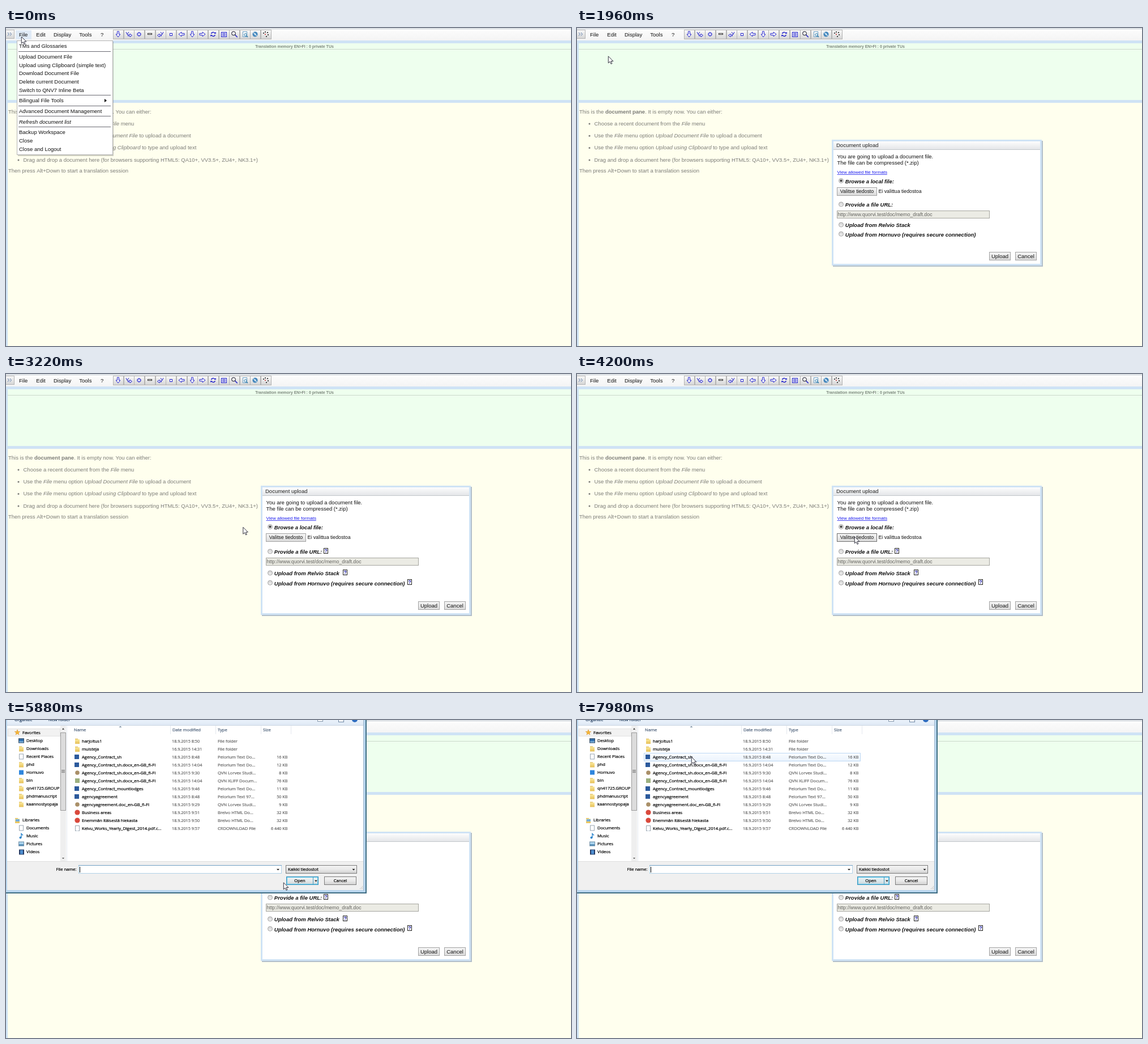
Write an HTML page with a canvas that moves like this. It is 998 by 561 pixels and loops after 8 s.

```html
<!DOCTYPE html>
<html lang="en">
<head>
<meta charset="utf-8">
<title>Document upload</title>
<style>
html, body { margin: 0; width: 100%; height: 100%; overflow: hidden; background: #ffffee; }
canvas { display: block; }
</style>
</head>
<body>
<canvas id="stage" width="998" height="561"></canvas>
<script>
const ctx = document.getElementById('stage').getContext('2d');
const LOOP = 8000, STEP = 140;
const ARIAL = '"Liberation Sans", Arial, sans-serif';
const UI = '"Open Sans", "Noto Sans", sans-serif';
const BLUE = '#2424cc', FRAME = '#cfe3f5';

// Pointer tip: time, x, y
const PATH = [
  [0, 27, 15], [700, 27, 15], [840, 38, 30], [980, 56, 60], [1120, 55, 49.5],
  [2380, 55, 49.5], [2660, 92, 82], [3080, 370, 240], [3360, 467, 300],
  [3500, 471, 295.5], [3640, 478, 292], [4200, 490, 286.5], [6580, 490, 286.5],
  [6720, 474, 278], [7140, 278, 186.5], [7560, 232, 104], [7700, 216, 80],
  [7840, 204, 69], [7980, 202, 65]
];

const MENU = [
  ['TMs and Glossaries', 32], ['Upload Document File', 50.5],
  ['Upload using Clipboard (simple text)', 65.5], ['Download Document File', 80],
  ['Delete current Document', 94.8], ['Switch to QNV7 Inline Beta', 109.5],
  ['Bilingual File Tools', 128], ['Advanced Document Management', 147],
  ['_Refresh document list_', 165.5], ['Backup Workspace', 184],
  ['Close', 198.8], ['Close and Logout', 213.5]
];

const FILES = [
  ['folder', 'harjoitus1', '18.9.2015 8:50', 'File folder', ''],
  ['folder', 'muisteja', '16.9.2015 14:31', 'File folder', ''],
  ['text', 'Agency_Contract_sh', '18.9.2015 8:48', 'Pelorium Text Do...', '16 KB'],
  ['text', 'Agency_Contract_sh.docx_en-GB_fi-FI', '16.9.2015 14:04', 'Pelorium Text Do...', '12 KB'],
  ['tool', 'Agency_Contract_sh.docx_en-GB_fi-FI', '18.9.2015 9:30', 'QVN Lorvex Studi...', '8 KB'],
  ['xml', 'Agency_Contract_sh.docx_en-GB_fi-FI', '16.9.2015 14:04', 'QVN XLIFF Docum...', '76 KB'],
  ['text', 'Agency_Contract_mountlodges', '16.9.2015 9:46', 'Pelorium Text Do...', '11 KB'],
  ['text', 'agencyagreement', '18.9.2015 8:48', 'Pelorium Text 97...', '50 KB'],
  ['tool', 'agencyagreement.doc_en-GB_fi-FI', '18.9.2015 9:29', 'QVN Lorvex Studi...', '9 KB'],
  ['web', 'Business areas', '18.9.2015 9:51', 'Brelvo HTML Do...', '32 KB'],
  ['web', 'Enemmän itäisestä hiekasta', '18.9.2015 9:50', 'Brelvo HTML Do...', '32 KB'],
  ['page', 'Kelvu_Works_Yearly_Digest_2014.pdf.c...', '18.9.2015 9:57', 'CRDOWNLOAD File', '6 440 KB']
];

const PLACES = [
  ['screen', 'Desktop'], ['folder', 'Downloads'], ['page', 'Recent Places'], ['folder', 'phd'],
  ['cloud', 'Hornuvo'], ['folder', 'bin'], ['folder', 'qn41725.GROUP'],
  ['folder', 'phdmanuscript'], ['folder', 'kaannostyopaja']
];
const LIBRARIES = [['page', 'Documents'], ['note', 'Music'], ['image', 'Pictures'], ['film', 'Videos']];

function fill(x, y, w, h, color) {
  ctx.fillStyle = color;
  ctx.fillRect(x, y, w, h);
}
function shade(y, h, ...colors) {
  const g = ctx.createLinearGradient(0, y, 0, y + h);
  colors.forEach((c, i) => g.addColorStop(i / (colors.length - 1), c));
  return g;
}
function box(x, y, w, h, color, edge) {
  fill(x, y, w, h, color);
  ctx.strokeStyle = edge;
  ctx.lineWidth = 1;
  ctx.strokeRect(x + .5, y + .5, w - 1, h - 1);
}
function poly(points, color, edge, width = 1) {
  ctx.beginPath();
  points.forEach(([x, y]) => ctx.lineTo(x, y));
  ctx.closePath();
  if (color) { ctx.fillStyle = color; ctx.fill(); }
  if (edge) { ctx.strokeStyle = edge; ctx.lineWidth = width; ctx.stroke(); }
}
function line(points, color, width = 1) {
  ctx.beginPath();
  points.forEach(([x, y]) => ctx.lineTo(x, y));
  ctx.strokeStyle = color;
  ctx.lineWidth = width;
  ctx.stroke();
}
function disc(x, y, r, color, edge, width = 1) {
  ctx.beginPath();
  ctx.arc(x, y, r, 0, 7);
  if (color) { ctx.fillStyle = color; ctx.fill(); }
  if (edge) { ctx.strokeStyle = edge; ctx.lineWidth = width; ctx.stroke(); }
}
// y is the middle of the capitals
function text(str, x, y, color, size = 9.5, style = '', family = ARIAL, align = 'left') {
  ctx.font = `${style} ${size}px ${family}`;
  ctx.textAlign = align;
  ctx.fillStyle = color;
  ctx.fillText(str, x, y + size * .36);
  return ctx.measureText(str).width;
}
// *bold* and _italic_ runs
function rich(str, x, y, color) {
  for (const run of str.split(/(\*[^*]+\*|_[^_]+_)/)) {
    const style = { '*': 'bold', '_': 'italic' }[run[0]];
    x += text(style ? run.slice(1, -1) : run, x, y, color, 9.5, style || '');
  }
}
// Small system text, slightly thickened
function ui(str, x, y, color = '#000', size = 7.55, align = 'left') {
  text(str, x, y, color, size, '', UI, align);
  ctx.strokeStyle = color;
  ctx.lineWidth = .22;
  ctx.strokeText(str, x, y + size * .36);
}
const down = (x, y, r = 2.5, color = '#111') => poly([[x - r, y - r / 2], [x + r, y - r / 2], [x, y + r / 2]], color);

function at(x, y, angle, draw) {
  ctx.save();
  ctx.translate(x, y);
  ctx.rotate(angle);
  draw();
  ctx.restore();
}
function arrow(x, y, turns, k = 1) {
  const p = [[-5, -1.4], [0, -1.4], [0, -3.8], [5, 0], [0, 3.8], [0, 1.4], [-5, 1.4]];
  at(x, y, turns * Math.PI * 2, () => poly(p.map(([a, b]) => [a * k, b * k]), '#fff', BLUE));
}
function lens(x, y, r) {
  line([[x + r * .7, y + r * .7], [x + r * 2.1, y + r * 2.1]], BLUE, 1.6);
  disc(x, y, r, '#fff', '#223', 1.1);
}

const TOOLS = [
  () => arrow(0, 0, .25),
  () => { line([[-5, -4], [-3, 0], [0, -4]], BLUE); line([[-3, 0], [-1, 2]], BLUE); arrow(2, 2, 0, .7); },
  () => { fill(-1.8, -3.5, 3.6, 7, BLUE); fill(-3.5, -1.8, 7, 3.6, BLUE); fill(-.8, -2.5, 1.6, 5, '#fff'); fill(-2.5, -.8, 5, 1.6, '#fff'); },
  () => box(-4, -2, 8, 3, '#fff', '#333'),
  () => { line([[5, -4], [3, 0], [0, -4]], BLUE); line([[3, 0], [1, 2]], BLUE); arrow(-2, 2, .5, .7); },
  () => box(-2, -2, 5, 5, '#fff', BLUE),
  () => arrow(0, 0, .5),
  () => arrow(0, 0, .25),
  () => arrow(0, 0, 0),
  () => {
    for (const turn of [0, Math.PI]) at(0, 0, turn, () => {
      ctx.beginPath();
      ctx.arc(0, 0, 3.5, 3.4, 5.9);
      ctx.strokeStyle = BLUE;
      ctx.lineWidth = 1.5;
      ctx.stroke();
      poly([[1.6, -1.2], [5.2, -1.2], [4.6, -4]], BLUE);
    });
  },
  () => { box(-5, -4, 10, 9, '#fff', BLUE); for (let y = -2; y < 4; y += 2) fill(-3, y, 6, 1, BLUE); },
  () => lens(-1, -1.5, 3.2),
  () => { box(-4, -5, 8, 10, '#fff', '#6c9fc4'); disc(1, 1, 2.3, '#e6f3fa', '#2c78a8'); line([[2.5, 2.5], [5, 5]], '#2c78a8', 1.4); },
  () => { disc(0, 0, 4.6, '#4688bd'); disc(0, 0, 1.4, '#fff'); line([[-3, -3], [3, 3]], '#cfe4f3', 1.2); },
  () => [[-4, -2], [-1, -4], [3, -3], [-1, 0], [4, 1], [1, 4]].forEach(([x, y], i) => disc(x, y, 1, i == 3 ? '#c33' : '#111'))
];

function page(menuOpen) {
  fill(0, 0, 998, 561, '#ffffee');
  fill(0, 0, 998, 23, shade(0, 23, '#fdfdfd', '#f4f4f4'));
  fill(0, 1, 998, 1, '#b9c2cb');
  fill(0, 22, 998, 5, FRAME);
  fill(3, 27, 995, 100, '#eeffee');
  fill(3, 37, 995, 1, '#cbd8cb');
  fill(0, 127, 998, 5, FRAME);
  fill(0, 22, 3, 539, FRAME);
  box(-1, 3, 16, 16, shade(3, 16, '#fafafa', '#d4d4d4'), '#b5b5b5');
  for (const x of [3, 7]) line([[x, 8], [x + 2.5, 10.8], [x, 13.6]], '#5578a8');
  if (menuOpen) fill(17, 4, 28, 16, '#dfeaf6');
  [['File', 23], ['Edit', 53.3], ['Display', 84], ['Tools', 129.3], ['?', 167]].forEach(([s, x]) => text(s, x, 12, '#111'));
  TOOLS.forEach((draw, i) => {
    const x = Math.round(189 + i * 18.65);
    box(x, 3, 19, 17, shade(3, 17, '#fcfcfc', '#d3d3d3'), '#b4b4b4');
    at(x + 9, 11, 0, draw);
  });
  text('Translation memory EN>FI : 0 private TUs', 509.5, 32, '#7b857b', 7, 'bold', ARIAL, 'center');

  const gray = '#7c7c78';
  rich('This is the *document pane*. It is empty now. You can either:', 4, 148, gray);
  [
    'Choose a recent document from the _File_ menu',
    'Use the _File_ menu option _Upload Document File_ to upload a document',
    'Use the _File_ menu option _Upload using Clipboard_ to type and upload text',
    'Drag and drop a document here (for browsers supporting HTML5: QA10+, VV3.5+, ZU4+, NK3.1+)'
  ].forEach((s, i) => {
    const y = 168.2 + i * 21.3;
    disc(22, y + .8, 1.5, gray);
    rich(s, 30.5, y, gray);
  });
  rich('Then press Alt+Down to start a translation session', 4, 252, gray);
}

function menu(tipY) {
  fill(21, 24, 169, 202, 'rgba(0,0,0,.18)');
  box(19, 22, 170, 202, '#fff', '#b4b4b4');
  for (const [s, y] of MENU) {
    if (Math.abs(y - tipY) < 7.35) fill(22, y - 7.3, 163, 14.6, '#dfebf9');
    rich(s, 23, y, '#111');
  }
  for (const y of [41, 118, 137, 155, 174]) fill(22, y, 163, 1, '#6a6a72');
  poly([[174, 125], [178, 128], [174, 131]], '#000');
}

function button(x, y, w, label, size, state) {
  const top = state == 'down' ? '#d2d2d2' : '#f7f7f7';
  const low = state == 'down' ? '#e4e4e4' : '#dadada';
  box(x, y, w, 15, shade(y, 15, top, low), state ? '#6f6f6f' : '#a2a2a2');
  text(label, x + w / 2, y + 7.2, '#111', size, '', ARIAL, 'center');
}
function radio(y, on) {
  disc(466.5, y, 4, shade(y - 4, 8, '#d2d2d2', '#f2f2f2'), '#a5a5a5');
  if (on) disc(466.5, y, 2.1, '#444');
}
function help(x, y) {
  box(x, y, 8, 10, '#fff', '#222');
  text('?', x + 4, y + 5, '#1414a0', 8.5, 'bold', ARIAL, 'center');
}

// Before the help icons load the lower rows sit a little higher
function uploadBox(loaded, state) {
  const up = n => loaded ? 0 : n, h = 228 - up(6);
  fill(452, 199, 371, h, '#b3bfca');
  fill(450, 197, 371, h, FRAME);
  fill(453, 200, 365, h - 6, '#fff');
  fill(453, 200, 365, 14, shade(200, 14, '#fdfdfd', '#e4e6e9'));
  fill(453, 214, 365, 1, '#c2c6ca');
  text('Document upload', 458, 207, '#222');
  text('You are going to upload a document file.', 459.5, 227, '#111');
  text('The file can be compressed (*.zip)', 459.5, 237.7, '#111');
  const w = text('View allowed file formats', 459.5, 254, '#1a1aee', 8.05);
  fill(459.5, 258, w, .8, '#1a1aee');
  const label = (s, y) => text(s, 473.8, y, '#111', 9.5, 'italic bold');
  radio(269.5, true);
  label('Browse a local file:', 271);
  button(459, 281, 71, 'Valitse tiedosto', 8.9, state);
  text('Ei valittua tiedostoa', 532.5, 288, '#111', 8.77);
  radio(313 - up(2));
  label('Provide a file URL:', 314 - up(2));
  box(459, 324 - up(2), 270, 14, '#ebebe4', '#a6a6a0');
  text('http://www.quorvi.test/doc/memo_draft.doc', 460.5, 331 - up(2), '#62625e', 8.85);
  radio(351 - up(4));
  label('Upload from Relvio Stack', 352 - up(4));
  radio(368.3 - up(5));
  label('Upload from Hornuvo (requires secure connection)', 369.5 - up(5));
  if (loaded) [[561, 307], [595, 345], [709, 362]].forEach(p => help(...p));
  button(728, 401 - up(6), 38, 'Upload', 9.5);
  button(774, 401 - up(6), 38, 'Cancel', 9.5);
}

const ICONS = {
  folder() { fill(-4, -4, 5, 2, '#d9b24a'); fill(-4, -3, 8, 8, shade(-3, 8, '#fbeaa0', '#e6bf55')); },
  text() { fill(-5, -4, 8, 8, '#2c5a9c'); },
  tool() { disc(0, 0, 3.8, '#a98f68'); },
  xml() { fill(-4, -4, 8, 8, '#9db07f'); },
  web() { disc(0, 0, 4.6, '#d9493c'); },
  cloud() { fill(-4, -4, 8, 8, '#2f86dd'); },
  page() { box(-4, -5, 8, 10, '#fff', '#9aa5b0'); fill(-2, 4, 4, 1, '#c8d4e0'); },
  screen() { box(-5, -4, 10, 8, '#2f6fb0', '#3a4d60'); fill(-4, 1, 8, 2, '#84b7dd'); },
  note() { disc(-1.5, 3, 2, '#2f86cc'); line([[0, 3], [0, -4], [3, -1]], '#2f86cc', 1.4); },
  image() { box(-5, -4, 10, 8, '#a9d3ee', '#7891a6'); fill(-4, 1, 8, 2, '#3d7aa8'); },
  film() { fill(-4, -4, 9, 9, '#253a63'); fill(-2, -3, 5, 7, '#4d8ed0'); }
};
const icon = (name, x, y) => at(x, y, 0, ICONS[name]);

function star(x, y) {
  const p = [...Array(10).keys()].map(i => {
    const a = i * Math.PI / 5 - Math.PI / 2, r = i % 2 ? 2 : 5;
    return [x + r * Math.cos(a), y + r * Math.sin(a)];
  });
  poly(p, '#f7b733', '#d98f22', .6);
}

function filePicker(t, tip) {
  fill(0, 0, 637, 306, '#3f6d84');
  fill(0, 0, 635, 304, '#b9d6ee');
  fill(631, 0, 1, 301, '#a3bace');
  fill(2, 0, 629, 300, '#fff');
  fill(2, 0, 629, 9, shade(0, 9, '#eaf2fb', '#dfe9f5'));
  fill(2, 9, 629, 1, '#cbd6e3');
  ui('Organize', 15, -1, '#1e395b');
  down(53, -1, 2);
  ui('New folder', 75, -1, '#1e395b');
  box(550, -4, 10, 7, '#fff', '#8598ad');
  box(587, -5, 10, 9, '#fff', '#6d87a4');
  disc(616, -1, 5, '#2d6cc0');

  // Sidebar
  box(3, 15, 93, 14, '#f2f2f2', '#e2e2e2');
  star(20, 22);
  ui('Favorites', 29, 22.5);
  PLACES.forEach(([kind, s], i) => { icon(kind, 27, 36.5 + 14 * i); ui(s, 36, 36.5 + 14 * i); });
  icon('folder', 20, 177);
  fill(17, 175, 7, 4, '#76aedb');
  ui('Libraries', 29, 176.7);
  LIBRARIES.forEach(([kind, s], i) => { icon(kind, 27, 190.5 + 14 * i); ui(s, 36, 190.5 + 14 * i); });
  fill(96, 10, 10, 239, '#efefef');
  box(96, 22, 10, 138, '#dcdcdc', '#9b9b9b');
  for (const y of [88, 90, 92]) fill(98, y, 6, 1, '#777');
  poly([[99, 17], [103, 17], [101, 14]], '#444');
  down(101, 244, 2, '#444');
  fill(107, 10, 1, 239, '#e3e9f0');

  // File list
  const soft = '#666';
  [['Name', 120], ['Date modified', 294], ['Type', 374], ['Size', 454]].forEach(([s, x]) => ui(s, x, 17.5, '#4c607a'));
  for (const x of [290, 370, 450, 503]) fill(x, 10, 1, 15, '#e4e8ee');
  poly([[199.5, 13], [204.5, 13], [202, 10.5]], '#7d90a3');
  FILES.forEach(([kind, name, date, type, size], i) => {
    const y = 37 + 14 * i;
    if (tip.x < 501 && tip.y >= y - 7 && tip.y < y + 7) box(118, y - 7, 383, 15, shade(y - 7, 15, '#fafcff', '#eaf3fd'), '#bcd8f4');
    icon(kind, 126, y);
    ui(name, 134, y);
    ui(date, 293, y, soft, 7.25);
    ui(type, 374, y, soft);
    ui(size, 497.5, y, soft, 7.25, 'right');
  });

  // Lower bar
  fill(2, 249, 629, 51, '#f0f0f0');
  fill(2, 249, 629, 1, '#dfdfdf');
  ui('File name:', 88.5, 263.5);
  box(128, 256, 359, 15, '#fff', '#b0d2e8');
  fill(128, 256, 359, 1, '#6f9fc4');
  down(480.5, 264);
  if (t < 6160 || t >= 6720 && t < 7140 || t >= 7700) fill(130, 259, 1, 10, '#000');
  const gray = y => shade(y, 15, '#f4f4f4', '#eaeaea', '#cfcfcf');
  box(494, 256, 126, 15, gray(256), '#7c7c7c');
  ui('Kaikki tiedostot', 498, 263.5);
  down(614, 264);
  const glow = t < 6720 ? 0 : .5 - .5 * Math.cos((t - 6720) / 1000 * Math.PI);
  box(495, 276, 57, 15, gray(276), '#3f93ba');
  fill(496, 277, 55, 13, `rgba(160,225,250,${.05 + .15 * glow})`);
  ctx.strokeStyle = '#62cbee';
  ctx.strokeRect(496.5, 277.5, 54, 12);
  fill(542, 277, 1, 13, '#4b9fc0');
  ui('Open', 519, 283.5, '#000', 7.55, 'center');
  down(547.5, 284);
  box(562, 276, 57, 15, gray(276), '#7c7c7c');
  ui('Cancel', 590.5, 283.5, '#000', 7.55, 'center');
  for (let i = 0; i < 3; i++) for (let j = 0; j <= i; j++) fill(629 - 2 * j, 293 + 2 * i, 1, 1, '#b5b5b5');
}

function pointer({ x, y }) {
  const p = [[0, 0], [0, 12], [2.8, 9.4], [4.7, 13.6], [6.6, 12.8], [4.8, 8.7], [8.6, 8.7]];
  at(x + .3, y + .3, 0, () => poly(p, '#fff', '#1c1c2c', .9));
}

function tipAt(t) {
  const i = PATH.findIndex(p => p[0] > t);
  if (i < 0) return { x: 202, y: 65 };
  const [a, b] = [PATH[i - 1], PATH[i]];
  const k = (t - a[0]) / (b[0] - a[0]);
  return { x: a[1] + (b[1] - a[1]) * k, y: a[2] + (b[2] - a[2]) * k };
}

function render(ms) {
  const t = Math.floor(ms / STEP) * STEP;
  const tip = tipAt(t), menuOpen = t < 1960;
  page(menuOpen);
  if (menuOpen) menu(tip.y);
  else {
    const over = t >= 3640 && t < 5880;
    uploadBox(t >= 2240, over && (t >= 5460 && t < 5740 ? 'down' : 'over'));
  }
  if (t >= 5880) filePicker(t, tip);
  pointer(tip);
}

let start;
function tick(now) {
  start ??= now;
  render((now - start) % LOOP);
  requestAnimationFrame(tick);
}
render(0);
requestAnimationFrame(tick);
</script>
</body>
</html>
```
